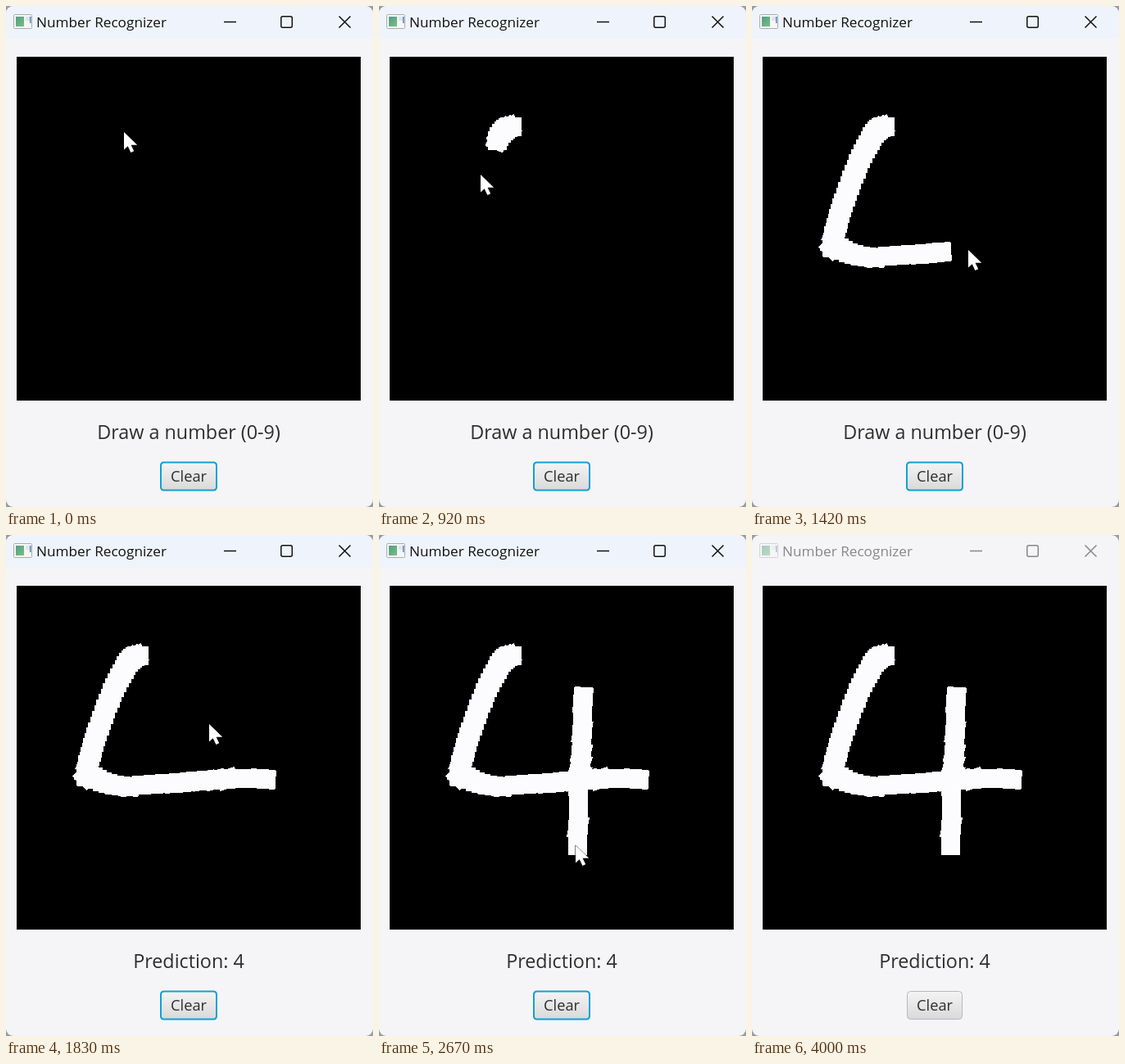
Recreate the animation shown at these times as an HTML page. Size 448 by 612 pixels, loop 4080 ms.

```html
<!DOCTYPE html>
<html lang="en">
<head>
<meta charset="utf-8">
<title>Number Recognizer</title>
<style>
  html, body { margin: 0; width: 100%; height: 100%; overflow: hidden; background: #989da2; }
  svg { display: block; width: 448px; height: 612px; }
  text { font-family: "Open Sans", "Noto Sans", sans-serif; fill: #2e2e2e; }
</style>
</head>
<body>
<svg viewBox="0 0 448 612">
  <defs>
    <linearGradient id="face" x2="0" y2="1">
      <stop stop-color="#f4f4f4"/><stop offset="1" stop-color="#d9d9da"/>
    </linearGradient>
    <linearGradient id="leaf" x2="1" y2="1">
      <stop stop-color="#4f9c8c"/><stop offset="1" stop-color="#7cc07c"/>
    </linearGradient>
    <clipPath id="window"><rect width="448" height="612" rx="9"/></clipPath>
  </defs>
  <g clip-path="url(#window)">
    <rect width="448" height="612" fill="#f5f5f7"/>
    <rect id="bar" width="448" height="40" fill="#eff4fc"/>
    <g id="caption">
      <rect x="9.5" y="10.5" width="22" height="17" rx="1" fill="#f5f6f6" stroke="#a9adad"/>
      <rect x="12" y="13" width="10" height="12" fill="url(#leaf)"/>
      <path d="M24 13h5v5h-5z" fill="#dce5ee"/>
      <path d="M29 13h1.5v8H29z" fill="#5a83b5"/>
      <text x="37" y="26" font-size="17.2" style="fill:#111">Number Recognizer</text>
      <g fill="none" stroke="#111" stroke-width="1.5">
        <path d="M266 19.5h15M406.5 12.5l14 14m0-14l-14 14"/>
        <rect x="335.8" y="12.8" width="13.5" height="13.5" rx="2"/>
      </g>
    </g>
    <path d="M13 62h420v420H13z"/>
    <path id="ink" fill="none" stroke="#fcfcff" stroke-width="23" stroke-linecap="square" shape-rendering="crispEdges"/>
    <text id="label" x="223" y="529" font-size="23.35" text-anchor="middle"></text>
    <rect x="189.5" y="557.5" width="67" height="34" rx="4" fill="url(#face)" stroke="#b8b8b8"/>
    <rect id="focus" x="189" y="557.5" width="68" height="34" rx="3.5" fill="none" stroke="#0fa1d6" stroke-width="2"/>
    <text x="223" y="581" font-size="18.3" text-anchor="middle">Clear</text>
    <path id="cursor" d="M0 0V21.5L4.7 17.2 8.4 25 12.2 23.2 8.6 15.8H16.2Z" fill="#fff" stroke="#000" paint-order="stroke"/>
  </g>
</svg>
<script>
const DURATION = 4080, STEP = 1000 / 12;
const PREDICTED = 21, GONE = 37, UNFOCUSED = 46;
const $ = id => document.getElementById(id);

// The pointer follows a chain of Bézier moves; each starts where the last one ended.
const moves = [];
let start = 1, from = [144, 154];
function move(until, points, pen = false) {
  moves.push({ start, until, points: [from, ...points], pen });
  start = until;
  from = points.at(-1);
}
move(9, [[148, 166], [172, 168], [162, 147]]);
move(14, [[136, 145], [84, 322], [101, 292]], true);
move(15, [[112, 300], [128, 307], [150, 307]], true);
move(19, [[307, 296], [241, 298], [317, 298]], true);
move(20, [[318, 298]]);
move(21.4, [[270, 170], [258, 135], [249, 197]]);
move(25, [[248, 276], [245, 290], [244, 297]], true);
move(28, [[243, 379], [242, 379], [242, 379]], true);
move(33, [[240, 379]]);
move(36, [[246, 390], [330, 583]]);

const mix = (a, b, u) => a + (b - a) * u;

function bezier(points, u) {
  while (points.length > 1)
    points = points.slice(1).map((p, i) => p.map((v, k) => mix(points[i][k], v, u)));
  return points[0];
}

function pointerAt(step) {
  const { start, until, points } = moves.find(m => step <= m.until) || moves.at(-1);
  return bezier(points, Math.min(1, Math.max(0, (step - start) / (until - start))));
}

// Upright squares joined by square-capped lines, snapped to whole pixels for ragged edges.
function inkPath(time) {
  let path = "";
  for (const { start, until, points, pen } of moves) {
    if (!pen) continue;
    const count = Math.round((until - start) * 7);
    for (let i = 0; i <= count && mix(start, until, i / count) <= time + 1e-6; i++) {
      const at = bezier(points, i / count).map(v => Math.floor(v + 1e-6) + 0.5).join(" ");
      path += `${i ? "L" : "M"}${at}M${at}h.01M${at}`;
    }
  }
  return path;
}

function draw(step) {
  $("ink").setAttribute("d", inkPath(step - 1));
  $("label").textContent = step < PREDICTED ? "Draw a number (0-9)" : "Prediction: 4";
  $("cursor").style.display = step < GONE ? "" : "none";
  $("cursor").setAttribute("transform", `translate(${pointerAt(step).map(Math.round)})`);

  const blur = Math.max(0, step - UNFOCUSED) / 2;
  $("caption").style.opacity = 1 - blur * 0.52;
  $("bar").style.opacity = 1 - blur;
  $("focus").style.opacity = blur ? 0 : 1;
}

let last = -1;
function tick() {
  // Steps change on the nearest hundredth of a second.
  const step = Math.floor((performance.now() % DURATION + 5) / STEP);
  if (step !== last) draw(last = step);
  requestAnimationFrame(tick);
}
tick();
</script>
</body>
</html>
```
